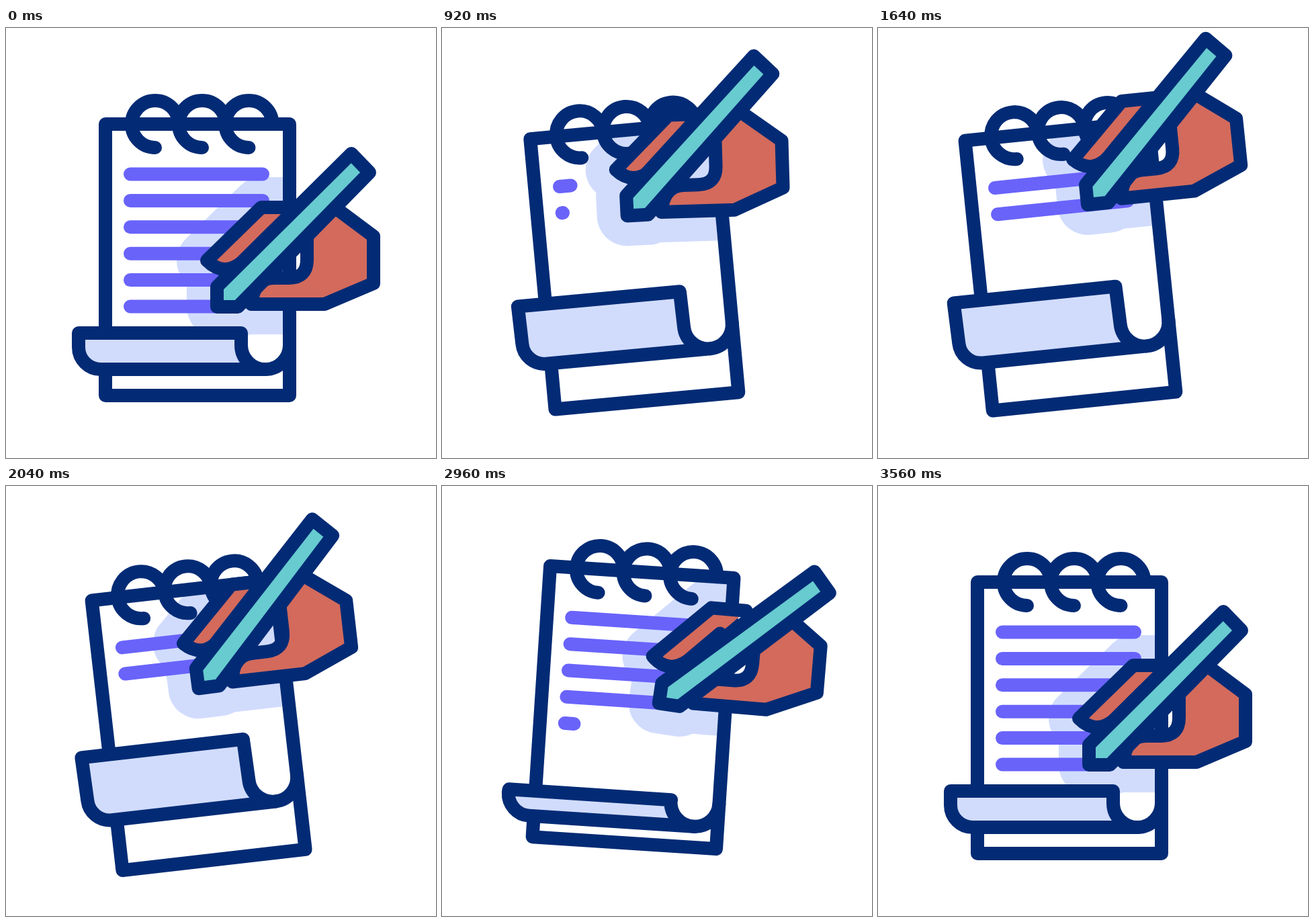
Write an HTML page with a canvas that moves like this. It is 640 px wide and 640 px high and loops after 3.6 s.

```html
<!DOCTYPE html>
<html lang="en">
<head>
<meta charset="utf-8">
<title>Writing in a notepad</title>
<style>
  html, body { margin: 0; width: 100%; height: 100%; overflow: hidden; background: #fff; }
  canvas { display: block; width: 640px; height: 640px; }
</style>
</head>
<body>
<canvas id="stage" width="640" height="640"></canvas>
<script>
const ctx = document.getElementById('stage').getContext('2d');
const LOOP = 3600;
const NAVY = '#032b75', PURPLE = '#6963fa', PALE = '#d1dcfd', TEAL = '#67cbd0', CORAL = '#d36a5c';

const TIP = [314, 415];
const pen = new Path2D('M314 385V415H345L541 215L514 187Z');
const palm = new Path2D('M448 308V345Q448 372 421 372H398Q369 373 365 411H474L547 380V310L488 266H455');
const finger = new Path2D('M396 304L352 348Q324 371 299 346L380 267H432');
const rings = new Path2D([222, 292, 361.5].map(x => `M${x + 35} 143A35 35 0 1 0 ${x} 178`).join(''));

const clamp = u => Math.max(0, Math.min(1, u));
const cubic = u => u < 0.5 ? 4 * u ** 3 : 1 - 4 * (1 - u) ** 3;
const sine = u => (1 - Math.cos(Math.PI * u)) / 2;
const easeOut = u => 1 - (1 - u) ** 3;
const progress = (t, start, duration) => clamp((t - start) / duration);
const bump = u => Math.sin(Math.PI * u) ** 2;

// Eases through [time, value] stops
const track = (stops, ease) => t => stops.slice(1).reduce((value, [time, next], i) => {
  const [from, previous] = stops[i];
  return value + (next - previous) * ease(progress(t, from, time - from));
}, stops[0][1]);

const padAngle = track([[0, 0], [540, -4.6], [1240, -5.7], [2380, -6.6], [2860, 3.8], [3560, 0]], cubic);
const tipX = track([[0, 314], [600, 365], [1260, 190], [1850, 370], [2220, 220], [3160, 335], [3560, 314]], sine);
const tipY = track([[0, 415], [1280, 256], [1530, 256], [2600, 336], [2900, 336], [3560, 415]], cubic);

function shape(path, fill, stroke = NAVY, width = 20) {
  if (fill) {
    ctx.fillStyle = fill;
    ctx.fill(path);
  }
  ctx.strokeStyle = stroke;
  ctx.lineWidth = width;
  ctx.stroke(path);
}

function turn(x, y, degrees, [px, py]) {
  ctx.translate(x, y);
  ctx.rotate(degrees * Math.PI / 180);
  ctx.translate(-px, -py);
}

// The pad drops as it leans left and rises as it leans right
function placePad(t) {
  const angle = padAngle(t);
  const x = 285 - 0.25 * Math.min(0, angle) - 11 * bump(progress(t, 2400, 600));
  const y = 345 - angle * (angle < 0 ? 1.65 : 4.1);
  turn(x, y, angle, [285, 345]);
}

// The pen tilts with its place on the line and with the pad's swing
function drawHand(t, shadow) {
  const part = (path, fill) => shadow ? shape(path, PALE, PALE, 90) : shape(path, fill);
  const x = tipX(t), swing = Math.max(0, padAngle(t));
  ctx.save();
  turn(x, tipY(t), 6.9 * bump(progress(t, 0, 1240)) + 0.27 * swing, TIP);
  part(palm, CORAL);
  part(finger, CORAL);
  turn(...TIP, Math.min(0, (x - TIP[0]) / 27) + swing, TIP);
  part(pen, TEAL);
  ctx.restore();
}

// Lines vanish from the bottom up, then come back in pairs
function drawLines(t) {
  for (let i = 0; i < 6; i++) {
    const start = [1140, 2170, 2810][i >> 1] + (i % 2) * 30 * (i + 1);
    const visible = t < 1140
      ? 1 - easeOut(progress(t, (5 - i) * 127, 510))
      : cubic(progress(t, start, 520));
    const length = visible * (i < 3 ? 197 : 140);
    if (length > 0.05) shape(new Path2D(`M185 ${217.5 + 39.4 * i}h${length}`), null, PURPLE);
  }
}

// The page rolls up as the pad leans left
function drawCurl(angle) {
  const top = 454 + angle * (angle < 0 ? 12.4 : 6.5);
  const bottom = 508 + angle * (angle < 0 ? 5.7 : 2.1);
  const lean = (top - 454) * 0.02;
  const page = `M${108 + lean} ${top}H${350 + lean}L350 ${bottom - 36}A36 36 0 0 0 386 ${bottom}`
    + `H141A33 33 0 0 1 108 ${bottom - 33}Z`;
  shape(new Path2D(page), PALE);
  shape(new Path2D(`M386 ${bottom}A36 36 0 0 0 422 ${bottom - 36}`));
}

function draw(t) {
  ctx.fillStyle = '#fff';
  ctx.fillRect(0, 0, 640, 640);
  ctx.lineCap = ctx.lineJoin = 'round';
  ctx.save();
  placePad(t);

  ctx.save();
  ctx.beginPath();
  ctx.rect(148, 143, 264, 404);
  ctx.clip();
  drawHand(t, true);
  ctx.restore();

  drawLines(t);
  shape(new Path2D('M148 143H422V547H148Z'));
  shape(rings);
  drawCurl(padAngle(t - 20));
  drawHand(t, false);
  ctx.restore();
}

function frame() {
  draw(performance.now() % LOOP);
  requestAnimationFrame(frame);
}
frame();
</script>
</body>
</html>
```
